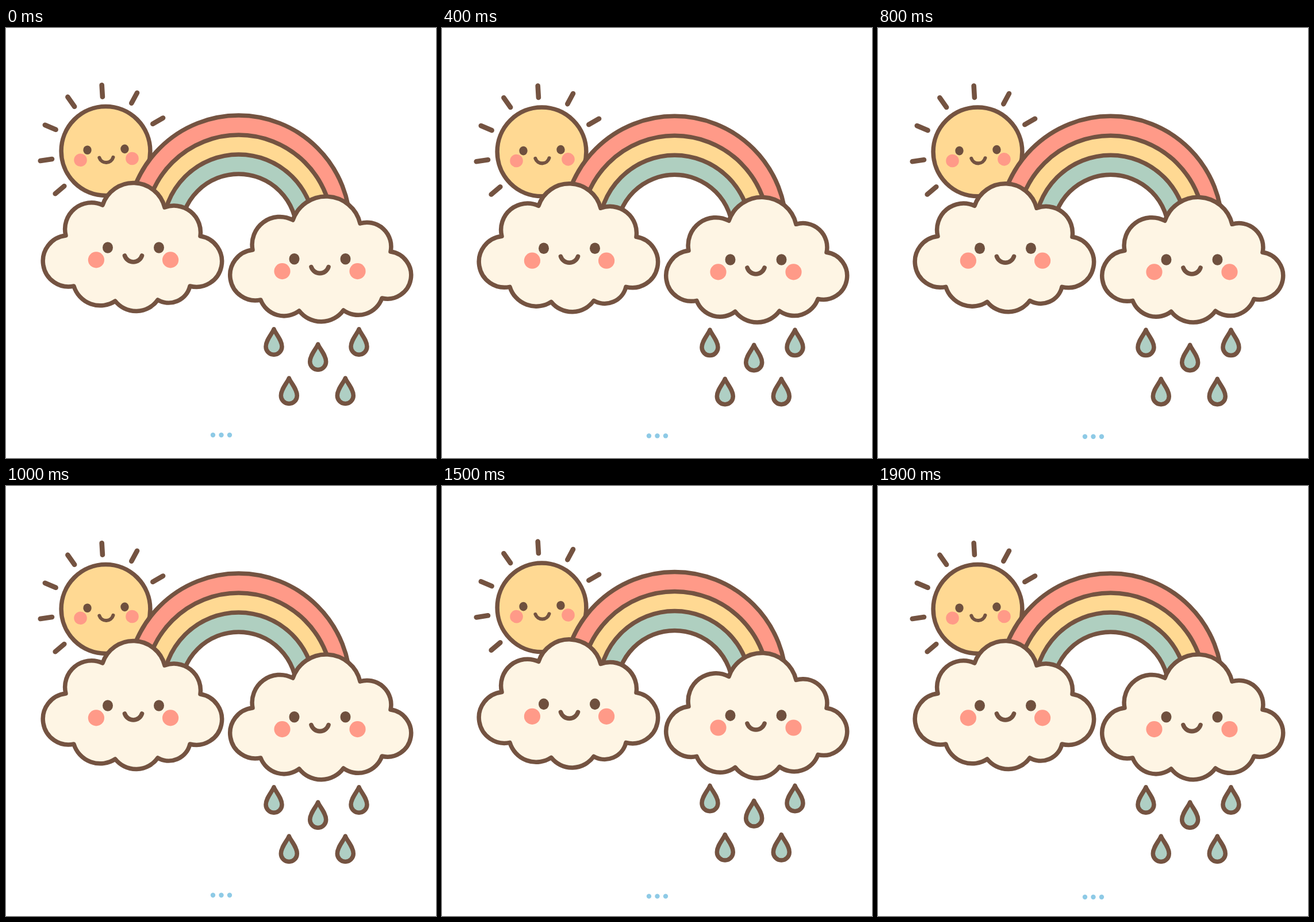
These frames come from a looping animation (748x748 px, 2 s). An HTML page:

```html
<!DOCTYPE html>
<html lang="en">
<head>
<meta charset="utf-8">
<title>Sun, rainbow and clouds</title>
<style>
  html, body { margin: 0; width: 100%; height: 100%; overflow: hidden; background: #fff; }
  svg { display: block; width: 100vw; height: 100vh; }
  .line { stroke: #745341; stroke-width: 7.5; stroke-linecap: round; stroke-linejoin: round; }
  .open { fill: none; }
  .eye { fill: #6f503e; }
  .cheek { fill: #ff9a88; }
  .sun { fill: #ffd993; }
  .cloud { fill: #fef5e4; }
  .drop { fill: #afcfc4; }
  .dot { fill: #8ecae6; }
</style>
</head>
<body>
<svg viewBox="0 0 748 748">
  <g id="scene"></g>
  <g id="dots"></g>
</svg>
<script>
const scene = document.getElementById("scene");
const dots = document.getElementById("dots");

function add(parent, tag, attrs) {
  const node = document.createElementNS("http://www.w3.org/2000/svg", tag);
  for (const key in attrs) node.setAttribute(key, attrs[key]);
  return parent.appendChild(node);
}

const path = (d, cls, extra, parent = scene) => add(parent, "path", { d, class: cls, ...extra });
const circle = (cx, cy, r, cls, parent = scene) => add(parent, "circle", { cx, cy, r, class: cls });

function face(x, y, eyeGap, cheekGap, size, tilt = 0) {
  const group = add(scene, "g", { transform: `translate(${x} ${y}) rotate(${tilt})` });
  for (const side of [-1, 1]) {
    add(group, "ellipse", { cx: side * eyeGap, cy: 0, rx: 9 * size, ry: 9.8 * size, class: "eye" });
    circle(side * cheekGap, 21.4 * size, 14.1 * size, "cheek", group);
  }
  const half = 15 * size;
  path(`M${-half} 14a${half * 1.05} ${half * 1.05} 0 0 0 ${2 * half} 0`, "line open",
    { style: `stroke-width:${7.6 * size}` }, group);
}

function sun(x, y) {
  circle(x, y, 77.4, "line sun");
  for (let i = 0; i < 7; i++) {
    const angle = -30 - 31.7 * i;
    path("M94.5 0H115", "line", {
      transform: `translate(${x} ${y}) rotate(${angle})`, style: "stroke-width:8.6"
    });
  }
  face(x + 0.5, y - 2.7, 32.5, 45, 0.8, -1.7);
}

// Evenly spaced arcs, each a little lower in centre than the one outside it.
function rainbow() {
  ["#ff9a88", "#ffd993", "#afcfc0", "#fff"].forEach((fill, i) => {
    const r = 194 - 31 * i;
    path(`M${404.7 - r} ${346 + 3 * i}a${r} ${r} 0 0 1 ${2 * r} 0`, "line", { fill });
  });
}

// Height of each lobe relative to half its chord, clockwise from the upper left.
const BULGES = [0.63, 0.75, 0.57, 1.05, 0.5, 0.5, 0.5, 1.05];

function cloud(notches) {
  const arcs = BULGES.map((bulge, i) => {
    const [x0, y0] = notches[i];
    const [x, y] = notches[(i + 1) % notches.length];
    const r = Math.hypot(x - x0, y - y0) * (1 + bulge * bulge) / (4 * bulge);
    return `A${r} ${r} 0 ${bulge > 1 ? 1 : 0} 1 ${x} ${y}`;
  });
  path(`M${notches[0]}${arcs.join("")}Z`, "line cloud");
}

function raindrop(x, y) {
  path("M0-22C3-14 14-3 14 8.5A14 14 0 0 1-14 8.5C-14-3-3-14 0-22Z", "line drop",
    { transform: `translate(${x} ${y})` });
}

sun(173.5, 214);
rainbow();
cloud([[104, 361], [168, 308], [276, 312], [338, 362], [320, 449], [264, 473], [190, 475], [118, 449]]);
face(221.5, 382, 44.5, 64.6, 1);
cloud([[429, 386], [499, 334], [616, 340], [669, 389], [654, 470], [587, 491], [510, 492], [443, 473]]);
face(546, 401.7, 44.5, 65.5, 1);
for (const side of [-1, 1]) {
  raindrop(540 + 74 * side, 545.8);
  raindrop(541.3 + 49 * side, 631);
}
raindrop(542.7, 572);
for (const i of [-1, 0, 1]) circle(374.5 + 14.5 * i, 708, 4.2, "dot", dots);

const LOOP = 2000;
const STEPS = 16;
const BOB = 1.3;

// Each second has ten ticks and eight steps; the first and seventh steps are held.
function stepAt(time) {
  const ticks = Math.floor(time % LOOP / 100);
  const n = ticks % 10;
  return Math.floor(ticks / 10) * STEPS / 2 + n - Math.ceil(n / 6);
}

function render(time) {
  const step = stepAt(time);
  // The bob snaps to whole units.
  const bob = Math.trunc(2 * Math.sin(2 * Math.PI * step / STEPS)) * BOB;
  scene.setAttribute("transform", `translate(0 ${bob})`);
  dots.setAttribute("transform", `translate(0 ${step * 0.47})`);
}

const origin = performance.now();
function tick() {
  render(performance.now() - origin);
  requestAnimationFrame(tick);
}
tick();
</script>
</body>
</html>
```
